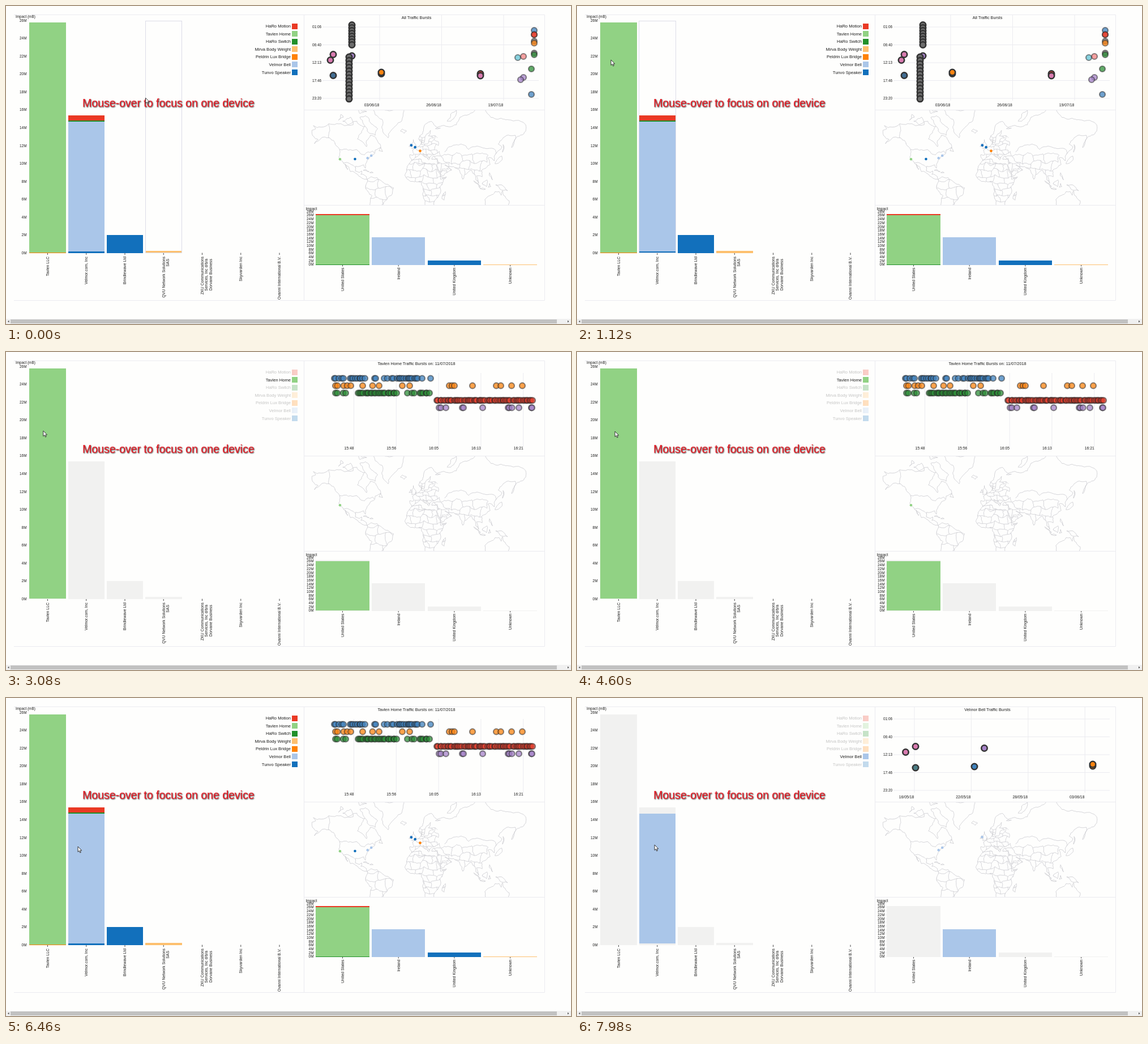
An HTML page for the animation above (8000 ms loop, 998 px wide and 561 px high).

```html
<!DOCTYPE html>
<html lang="en">
<head>
<meta charset="utf-8">
<title>Device traffic dashboard</title>
<style>
html, body { margin: 0; width: 100%; height: 100%; overflow: hidden; background: #fefefd; }
svg { display: block; width: 100%; height: 100%; font-family: "Liberation Sans", Arial, sans-serif; fill: #1c1c1c; }
rect { shape-rendering: crispEdges; }
.frame, .grid { stroke: #ebebf0; fill: none; }
.tick { stroke: #333; stroke-width: .9; }
.land { stroke: #c0c0c6; stroke-width: .65; fill: none; stroke-linejoin: round; }
.caption { font-size: 19.5px; fill: #ec1721; text-shadow: 1px 1px 2px #333; }
</style>
</head>
<body>
<svg id="stage" viewBox="0 0 998 561" preserveAspectRatio="none">
  <defs>
    <clipPath id="mapArea"><rect x="526" y="184" width="425" height="167"/></clipPath>
    <clipPath id="inland"><path id="inlandShape"/></clipPath>
  </defs>
  <path class="frame" d="M14 15.500H951.500V519.500H14M526.500 15V519M526 183.500H951M526 351.500H951"/>
  <g class="land" clip-path="url(#mapArea)"><path id="coast"/><path id="borders" clip-path="url(#inland)"/></g>
  <g id="axes"></g>
  <g id="data"></g>
  <g id="bursts"></g>
  <rect id="hover" y="26" width="64.500" height="409" fill="none" stroke="#dcdce8"/>
  <text class="caption" x="135" y="177.500">Mouse-over to focus on one device</text>
  <path id="cursor" d="M0 0V9.500L2.200 7.500L3.800 11L5.300 10.300L3.800 7H6.800Z" fill="#fff" stroke="#222" stroke-width=".9"/>
  <rect y="552" width="998" height="9" fill="#f0f0f0"/>
  <rect x="8" y="553" width="965" height="7" fill="#c1c1c1"/>
  <path d="M5.500 554.500V558.500L3 556.500ZM992 554.500V558.500L994.500 556.500Z" fill="#555"/>
</svg>
<script>
const $ = id => document.getElementById(id);
const DEVICES = [
  ['HaRo Motion', '#ea3924'], ['Tavlen Home', '#91d284'], ['HaRo Switch', '#21902a'],
  ['Mirva Body Weight', '#fdc06f'], ['Peldrin Lux Bridge', '#ff8205'],
  ['Velmor Bell', '#aac6e9'], ['Tunvo Speaker', '#1270bc'],
];
const [MOTION, HOME, SWITCH, SCALE, BRIDGE, BELL, SPEAKER] = DEVICES.keys();

const label = (x, y, text, size = 6.4, anchor = 'end') =>
  `<text x="${x}" y="${y + size * .36}" font-size="${size}" text-anchor="${anchor}">${text}</text>`;
const upright = (x, y, text) =>
  `<text transform="translate(${x + 2.4} ${y}) rotate(-90)" font-size="6.9" text-anchor="end">${text}</text>`;
const line = (x1, y1, x2, y2, kind) => `<path class="${kind}" d="M${x1} ${y1}L${x2} ${y2}"/>`;
const circle = (x, y, r, fill, extra = '') => `<circle cx="${x}" cy="${y}" r="${r}" fill="${fill}" ${extra}/>`;
function seeded(seed) {
  return () => (seed = (seed * 16807) % 2147483647) / 2147483647;
}

// World map: a few corners per landmass (lon,lat in Mercator), roughened into coastlines
const project = pair => {
  const [lon, lat] = pair.split(',').map(Number);
  return [722.8 + 1.085 * lon, 314.4 - 62.2 * Math.log(Math.tan(Math.PI / 4 + lat * Math.PI / 360))];
};
const LAND = [
  '-141,69.6 -166,68.5 -162,66.5 -168,65.6 -165,61 -158,58.5 -164,54.8 -150,60.5 -139,59.8 -130,54 -123,48.5 -124.4,40.3 -117,32.6 -110,23 -114,31 -105.5,20 -94,16 -83,8.3 -78,8 -83.3,15 -88.5,15.8 -87,21 -91,18.7 -97.3,21 -97,28 -84,30 -81,25.2 -81,31 -74,40 -66,44.5 -65,48.5 -56,52 -64,60 -73,62 -79,52 -94,59 -82,68 -95,71 -115,68.5',
  '-78,8 -72,12 -62,10.7 -51,2 -35.2,-6 -39,-18 -48.5,-26 -54,-36 -72,-36 -70.3,-18.4 -81,-5',
  '-6,35.8 10,37.3 11,33.5 20,31.5 33,31 37,20 43,11.5 51,11.8 40,-4 40.5,-15 35,-22 30,-36 18,-36 12,-17 9,4 -7.5,4.4 -17,14.7 -13,27.7',
  '-5.6,36 -9,43 -1.8,43.4 -4.5,48.3 8.5,53.8 10.5,57.7 10,54.2 20,54.5 23.5,59.2 30,59.8 21.5,61.5 25,65.5 17.3,62 14.3,55.5 5.3,59 14,67.5 26,71 41,67 33,66.6 44,68.5 67,69 73,73 104,77.5 140,72.5 180,69 180,65 163,59 157,51 163,62 142,59 135,54.5 141,52 129,42 129,35.5 125,39 118,39 122,30.5 108,21.5 109,12 100,13.5 103.5,1.4 98,14 91.5,22.5 80.3,15 77.5,8 72.5,21 66.7,25 48,30 56,25 59.5,22.5 45,13 35,28 36,36.8 27,37.5 29,41 41,41.5 39,47 28,43 22,36.7 19,42.3 12.3,45 18,40 9,44.3 0,39.5',
  '-72,77 -54,72 -53,65 -44,60 -40,65 -22,71 -19,77',
  '113,-36 113.5,-24 130,-12 136.800,-12 140,-17.7 142.5,-10.7 153,-26 150,-36',
  '-65,62 -78,65 -90,73 -81,73.7 -61,66.5', '-101,69 -105,73 -118,71', '-125,71.5 -117,73 -121,74.3',
  '-92,76.5 -90,74.6 -79,75.5', '-59,47.7 -53,46.8 -56,51.5', '-24,65 -18,63.4 -14,65 -21,66.4',
  '-84.5,22 -75,20 -80,23', '-74,18.5 -68.5,18.5 -71,19.8', '-5.5,50 1.5,51.5 -3,58.5 -5,55', '-10,52 -6,52 -7,55',
  '52,71 58,71 68,76.5', '49.3,-12 47,-25 43.5,-23', '130,31.5 141,41.5 140,35.5', '142,46 143,54 144,50',
  '109,1 117,7 116,-4', '95.3,5.6 106,-3 105,-6', '105.3,-6.8 114.5,-8 108,-8', '119,-5 121,1.3 123,-4',
  '131,-1 145,-4.5 150.5,-10.5 138,-8', '120.5,14 121,18.3 126,7',
];
const FRONTIERS = ['-141,69.6 -141,60.3 -130,55', '-123,49 -95,49 -82.5,43 -69,47.3 -67,45',
  '-117,32.6 -106,31.5 -97,26', '48,46 61,53 77,54 87,49.2 98,52 118,50 131,48 131,43'];

const jitter = seeded(77);
function roughen([x1, y1], [x2, y2]) {
  const dx = x2 - x1, dy = y2 - y1;
  if (Math.hypot(dx, dy) < 4) return `L${x2.toFixed(1)} ${y2.toFixed(1)}`;
  const bend = (jitter() - .5) * .32;
  const mid = [(x1 + x2) / 2 - dy * bend, (y1 + y2) / 2 + dx * bend];
  return roughen([x1, y1], mid) + roughen(mid, [x2, y2]);
}
const trace = (text, closed) => {
  const points = text.split(' ').map(project);
  if (closed) points.push(points[0]);
  return 'M' + points[0] + points.slice(1).map((p, i) => roughen(points[i], p)).join('');
};
// Country borders: a jittered brick mesh, clipped to the land
function mesh(left, top, right, bottom, cell) {
  const cols = Math.ceil((right - left) / cell), rows = Math.ceil((bottom - top) / cell / 1.4);
  const grid = Array.from({ length: rows + 1 }, (_, j) => Array.from({ length: cols + 1 }, (_, i) =>
    [left + (i + jitter() * .9) * cell, top + (j + jitter() * .6) * cell * 1.4]));
  let d = '';
  grid.forEach((row, j) => row.forEach((p, i) => {
    if (i < cols) d += 'M' + p + roughen(p, row[i + 1]);
    if (j < rows && (i + j) % 2 === 0) d += 'M' + p + roughen(p, grid[j + 1][i]);
  }));
  return d;
}
const coast = LAND.map(shape => trace(shape, true)).join('');
$('coast').setAttribute('d', coast);
$('inlandShape').setAttribute('d', coast);
$('borders').setAttribute('d', FRONTIERS.map(f => trace(f)).join('') + mesh(702, 275, 772, 352, 8) +
  mesh(722, 228, 758, 270, 5.5) + mesh(634, 302, 685, 352, 11) + mesh(764, 258, 838, 305, 10));

// Axes
const column = i => 73.5 + 68.25 * i;
const country = i => 594.5 + 98.7 * i;
let axes = label(17, 18.5, 'Impact (mB)', 6.4, 'start') + label(529.5, 357.5, 'Impact', 6.6, 'start');
function scale(x, base, unit, max) {
  for (let m = 0; m <= max; m += 2) axes += label(x, base - unit * m, m + 'M') + line(x + 1, base - unit * m, x + 3, base - unit * m, 'grid');
}
scale(36.5, 435.5, 15.77, 26);
scale(543.5, 456, 3.34, 28);
[['Tavlen LLC'], ['Velmor.com, Inc'], ['Brindlewave Ltd'], ['QVU Network Solutions', 'SAS'],
 ['ZKU Communications', 'Services, Inc d/b/a', 'Dorvane Business'], ['Skyvarden Inc'], ['Ovanni International B.V.'],
].forEach((rows, i) => {
  axes += line(column(i), 435.5, column(i), 439, 'tick');
  rows.forEach((row, k) => axes += upright(column(i) + 7.4 * k, k ? 446 : 442, row));
});
['United States', 'Ireland', 'United Kingdom', 'Unknown'].forEach((name, i) =>
  axes += line(country(i), 456.5, country(i), 459.5, 'tick') + upright(country(i), 461.5, name));
$('axes').innerHTML = axes;

// Stacks of [device, millions], from the axis upward
const COMPANIES = [
  [[BRIDGE, .06], [HOME, 25.74]], [[SPEAKER, .18], [BELL, 14.5], [SWITCH, .1], [MOTION, .59]],
  [[SPEAKER, 1.98]], [[SCALE, .25]],
];
const COUNTRIES = [
  [[SWITCH, .24], [HOME, 26.05], [MOTION, .48]], [[BELL, 14.6]], [[SPEAKER, 2.1]], [[SCALE, .2]],
];
const SERVERS = [
  [HOME, '-122.4,37.6'], [SPEAKER, '-98,37.8'], [BELL, '-77.5,39'], [BELL, '-71.5,42'],
  [BELL, '-6.7,53.6'], [SPEAKER, '-6.3,53.3'], [SPEAKER, '-.2,51.4'], [BRIDGE, '8,47.5'],
];
function drawData(focus) {
  const faded = d => focus !== null && focus !== d;
  const bars = (stacks, center, width, base, unit) => stacks.map((stack, i) => {
    let y = base;
    return stack.map(([d, amount]) => {
      const height = amount * unit;
      y -= height;
      return `<rect x="${center(i) - width / 2}" y="${y}" width="${width}" height="${height}" fill="${faded(d) ? '#f1f1f0' : DEVICES[d][1]}"/>`;
    }).join('');
  }).join('');
  const legend = DEVICES.map(([name, color], d) => {
    const y = 35.5 + 13.55 * d;
    return `<g opacity="${faded(d) ? .25 : 1}">${label(503, y, name, 7.6)}<rect x="505" y="${y - 5}" width="10" height="10" fill="${color}"/></g>`;
  }).join('');
  const servers = SERVERS.filter(([d]) => !faded(d)).map(([d, place]) => circle(...project(place), 2.3, DEVICES[d][1])).join('');
  $('data').innerHTML = bars(COMPANIES, column, 64.5, 435.5, 15.77) + bars(COUNTRIES, country, 94.5, 456.5, 3.34) + legend + servers;
}

// Traffic bursts
const INK = { grey: '#6d6d6d', pink: '#d97bb0', slate: '#426e94', orange: '#ff8410', blue: '#3f82bd', red: '#e5402f',
  green: '#2e8f38', cyan: '#62c3d4', lilac: '#a683c8', rose: '#f08080', teal: '#4c7d85' };
const dark = (x, y, ink) => circle(x, y, 5.2, INK[ink], 'stroke="#333" stroke-width="2.6"');
const soft = (x, y, ink) => circle(x, y, 5, INK[ink], 'fill-opacity=".75" stroke="#222" stroke-opacity=".5" stroke-width="2.2"');
const dots = (draw, spec) => spec.split(' ').map(s => draw(...s.split(','))).join('');
const pile = (x, y, count, step) => Array.from({ length: count }, (_, i) => dark(x, y + i * step, 'grey')).join('');
const hours = ['01:06', '06:40', '12:13', '17:46', '23:20'].map((hour, i) =>
  label(557, 37 + 31.5 * i, hour) + line(559, 37 + 31.5 * i, 941, 37 + 31.5 * i, 'grid')).join('');
function chart(title, x, step, dates, top, offset, y) {
  return label(725, 20.5, title, 7.3, 'middle') + dates.split(' ').map((date, i) => {
    const at = x + step * i;
    return line(at + offset, top, at + offset, 167, 'grid') + label(at, y, date, 6.8, 'middle');
  }).join('');
}
// Each span "from-to*count" scatters bursts between its ends
function row(index, ink, spans) {
  const random = seeded(901 + index);
  return spans.split(' ').flatMap(span => {
    const [from, to, count] = span.split(/[-*]/).map(Number);
    return Array.from({ length: count }, (_, i) => {
      const inner = i > 0 && i < count - 1;
      return soft(from + (to - from) * (i + (inner ? random() - .5 : 0)) / (count - 1), 46.5 + 12.95 * index, ink);
    });
  }).join('');
}
const BURSTS = {
  all: () => hours + chart('All Traffic Bursts', 646, 109.5, '03/06/18 26/06/18 19/07/18', 15, 14, 175) +
    pile(611, 33.5, 8, 5) + dark(611, 88, 'lilac') + pile(606, 90, 13, 6.15) +
    dots(dark, '578,85.5,pink 573,95.5,pink 578,122.5,slate 663,119.5,grey 663,117,orange 838,119.5,red 838,123,pink') +
    dots(soft, '933,43,blue 933,50.5,red 933,50.5,red 933,62,grey 933,65.5,orange 933,83,grey 933,86,green 904,91,cyan 914,89,rose 928,111,green 914,126,lilac 909,130,lilac 928,156,blue'),
  home: () => chart('Tavlen Home Traffic Bursts on: 11/07/2018', 606, 74.8, '15:48 15:56 16:05 16:13 16:21', 37, 8.5, 170) +
    row(0, 'blue', '580-596*5 608-634*9 651-653*2 668-684*4 691-727*13 735-750*2') +
    row(1, 'orange', '582-609*5 630-659*3 700-713*2 783-792*3 824-866*2 874-912*3') +
    row(2, 'green', '582-600*4 622-690*22 709-721*3 731-748*6') +
    row(3, 'red', '761-930*58') +
    row(4, 'lilac', '765-777*3 806-808*2 842-887*2 889-906*3 928-929*2'),
  bell: () => hours + chart('Velmor Bell Traffic Bursts', 582, 100.4, '16/05/18 22/05/18 28/05/18 03/06/18', 15, 14, 175) +
    dots(dark, '598,85.5,pink 580.5,95.5,pink 598,123,teal 719.5,88.5,lilac 702,121,blue 911,120,orange 911,117,orange'),
};

// Timeline: [start, focused device, burst chart, hovered column]
const STATES = [
  [0, null, 'all', 3], [480, null, 'all', 2], [740, null, 'all', 1], [1400, HOME, 'home', null],
  [6160, null, 'home', null], [7640, BELL, 'bell', null],
];
// Pointer moves: [start, end, dx, dy]
const MOVES = [[200, 1080, -186.5, -67], [1160, 1640, 4.5, 43], [1700, 4400, 2.5, 2], [5880, 6420, 60, 122], [6700, 7500, 10, -3]];
const ease = k => k * k * (3 - 2 * k);
let shown = null;
function render(t) {
  const state = STATES.filter(s => s[0] <= t).pop();
  if (state !== shown) {
    shown = state;
    const [, focus, bursts, hovered] = state;
    drawData(focus);
    $('bursts').innerHTML = BURSTS[bursts]();
    $('hover').style.display = hovered === null ? 'none' : '';
    $('hover').setAttribute('x', column(hovered) - 32.25);
  }
  let x = 246.5, y = 162;
  for (const [from, to, dx, dy] of MOVES) {
    const k = ease(Math.min(1, Math.max(0, (t - from) / (to - from))));
    x += dx * k;
    y += dy * k;
  }
  $('cursor').setAttribute('transform', `translate(${x} ${y})`);
}
const start = performance.now();
function tick() {
  render((performance.now() - start) % 8000);
  requestAnimationFrame(tick);
}
tick();
</script>
</body>
</html>
```
